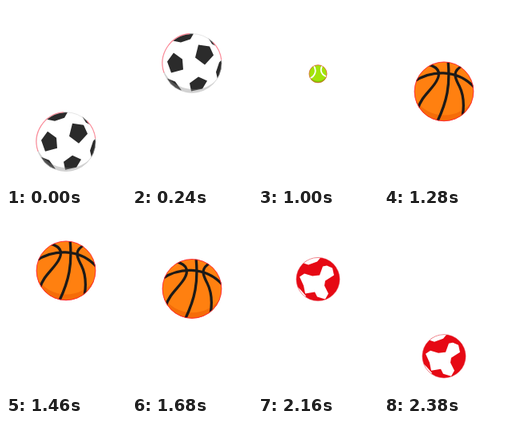
These frames come from a looping animation (150 px wide and 225 px high, 2400 ms). An HTML page:

```html
<!DOCTYPE html>
<html>
<head>
<meta charset="utf-8">
<title>Bouncing balls</title>
<style>
html, body { margin: 0; width: 100%; height: 100%; overflow: hidden; background: #fff; }
svg { display: block; width: 100%; height: 100%; }
</style>
</head>
<body>
<svg viewBox="0 0 150 225">
  <defs>
    <clipPath id="big"><circle r="37.2"/></clipPath>
    <clipPath id="mid"><circle r="27.3"/></clipPath>
    <clipPath id="small"><circle r="11.3"/></clipPath>
  </defs>

  <g class="ball">
    <g clip-path="url(#big)">
      <circle r="37.2" fill="#fff"/>
      <path fill="#2b2b2b" d="M-24-28L-10-38L2-37L-2-30L-14-26Z
        M8-23L22-21L27-10L16 2L4-7Z
        M-23-13L-12-5L-11 8L-26 12L-31-2Z
        M34-1L39-6L38 12L32 20L30 11Z
        M-31 19L-21 23L-13 34L-24 32Z
        M-3 25L8 17L19 22L13 32L-1 35Z
        M20-32L28-27L29-22L25-24Z"/>
      <path fill="#888" fill-opacity=".38" d="M-37 5C-31 24-10 37 14 31C25 28 33 20 37 10V40H-37Z"/>
    </g>
    <circle r="36.9" fill="none" stroke="#ccc" stroke-width=".5"/>
    <path fill="none" stroke="#ff8796" stroke-width="1.1" d="M-35 12A37 37 0 0 1-3-36.9M26-26.3A37 37 0 0 1 36.8-4"/>
  </g>

  <g class="ball">
    <g clip-path="url(#small)">
      <circle r="11.3" fill="#a2e30a"/>
      <path fill="#86c800" d="M-11 4Q0 14 11 4V12H-11Z"/>
      <path fill="none" stroke="#fff" stroke-width="1.8" d="M-6-11C-1-5-3 3-11 6M6-11C1-4 5 2 12 4"/>
    </g>
    <circle r="11.1" fill="none" stroke="#e8503c" stroke-width=".7"/>
  </g>

  <g class="ball">
    <g clip-path="url(#big)">
      <circle r="37.2" fill="#ff8010"/>
      <path fill="#f56c08" d="M-37 8C-24 33 16 40 37 10V40H-37Z"/>
      <path fill="none" stroke="#1c1a18" stroke-width="3.3" d="M-38-12C-18-26 16-30 39-4
        M5-39C8-8 4 12-9 39
        M-21-34C-3-30-4-20-12-9S-28 7-33 22
        M24-33C9-25 14-17 19-7S26 15 23 32"/>
    </g>
    <circle r="36.9" fill="none" stroke="#ff2438" stroke-width=".9"/>
  </g>

  <g class="ball">
    <g clip-path="url(#mid)">
      <circle r="27.3" fill="#e60914"/>
      <path fill="#fff" d="M-23-3L-17-7L-7-4L2-5L6-16L11-17L18-14L20-5L9 2L8 8L13 18L9 25L-1 22L-4 16L-16 18L-18 8Z
        M-18-20L-9-28L4-28L-1-22L-12-18Z
        M22-20L28-13L26-9L23-14Z
        M-27 8L-22 13L-15 21L-18 25Z
        M14 25L21 17L26 13L23 24Z"/>
    </g>
    <circle r="27.1" fill="none" stroke="#e8505c" stroke-width=".6"/>
  </g>
</svg>
<script>
const LOOP = 2400, SLOT = 600, STEP = 20;
// resting centre, bounce height, take-off and landing time
const balls = [
  { y: 169.7, rise: 99, from: 0, to: 600 },
  { y: 195.5, rise: 115, from: 600, to: 1200 },
  { y: 169.7, rise: 99, from: 1194, to: 1797 },
  { y: 178.8, rise: 98.3, from: 1814, to: 2381 }
];
const nodes = [...document.querySelectorAll('.ball')];

function height(b, t) {
  const u = Math.abs(2 * (t - b.from) / (b.to - b.from) - 1);
  return b.rise * (1 - Math.min(1, u) ** 3);
}

function draw(ms) {
  const t = Math.floor(ms % LOOP / STEP) * STEP;
  const i = Math.floor(t / SLOT);
  const b = balls[i];
  nodes.forEach((n, k) => n.setAttribute('visibility', k === i ? 'visible' : 'hidden'));
  nodes[i].setAttribute('transform', `translate(75 ${b.y - height(b, t)})`);
}

const start = performance.now();
function tick() {
  draw(performance.now() - start);
  requestAnimationFrame(tick);
}
tick();
</script>
</body>
</html>
```
